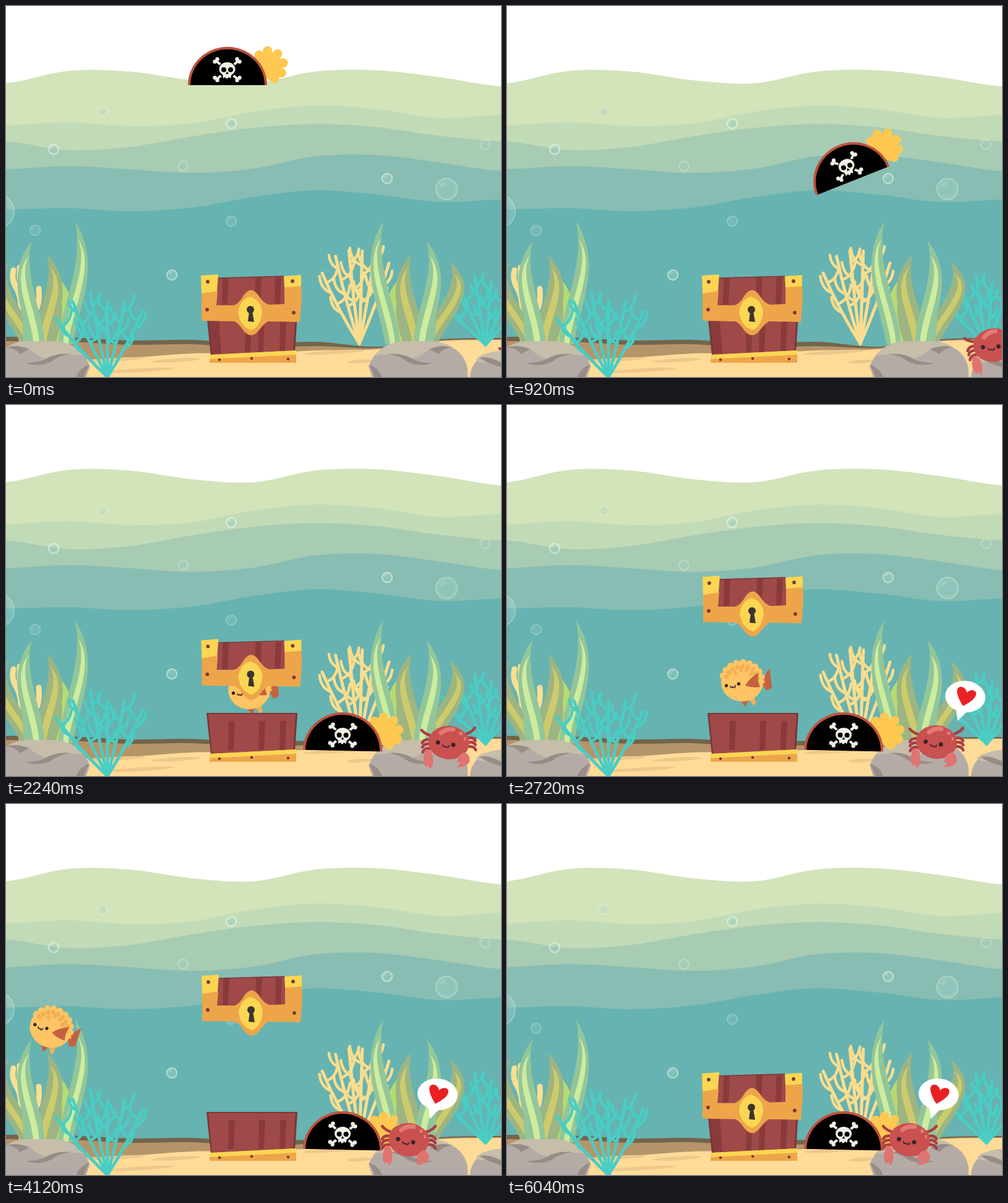
These frames come from a looping animation (800 px wide and 600 px high, 6.08 s). An HTML page with a canvas:

```html
<!DOCTYPE html>
<html lang="en">
<head>
<meta charset="utf-8">
<title>Under the sea</title>
<style>
html, body { margin: 0; width: 100%; height: 100%; overflow: hidden; background: #fff; }
canvas { display: block; width: 800px; height: 600px; }
</style>
</head>
<body>
<canvas id="stage" width="800" height="600"></canvas>
<script>
const LOOP = 6080, STEP = 40;
const stage = document.getElementById('stage').getContext('2d');
let c = stage;

// ---------- drawing helpers ----------
function fill(color, d) {
  c.fillStyle = color;
  c.fill(new Path2D(d));
}
function line(color, width, d) {
  c.strokeStyle = color;
  c.lineWidth = width;
  c.lineCap = c.lineJoin = 'round';
  c.stroke(new Path2D(d));
}
function oval(color, x, y, rx, ry = rx, rot = 0, from = 0, to = 7) {
  c.fillStyle = color;
  c.beginPath();
  c.ellipse(x, y, rx, ry, rot, from, to);
  c.fill();
}
// Draws art made around (ox, oy) at (x, y), turned by deg.
function place([x, y, deg = 0], ox, oy, art) {
  c.save();
  c.translate(x, y);
  c.rotate(deg * Math.PI / 180);
  c.translate(-ox, -oy);
  art();
  c.restore();
}
// Fills everything below a smooth curve with a height every 100 px.
function ground(color, ...h) {
  c.fillStyle = color;
  c.beginPath();
  c.moveTo(0, h[0]);
  const slope = i => ((h[i + 1] ?? h[i]) - (h[i - 1] ?? h[i])) / 6;
  for (let i = 0; i < h.length - 1; i++) {
    const x = i * 100;
    c.bezierCurveTo(x + 33, h[i] + slope(i), x + 67, h[i + 1] - slope(i + 1), x + 100, h[i + 1]);
  }
  c.lineTo(800, 600);
  c.lineTo(0, 600);
  c.fill();
}
function random(seed) {
  return () => (seed = seed * 16807 % 2147483647) / 2147483647;
}

// ---------- motion helpers ----------
const mix = (a, b, u) => a + (b - a) * u;
const smooth = v => (v = Math.max(0, Math.min(1, v)), v * v * (3 - 2 * v));
const ramp = (t, from, to) => smooth((t - from) / (to - from));

// Index of the row that holds time t.
function rowAt(rows, t) {
  let i = 0;
  while (i < rows.length - 2 && t >= rows[i + 1][0]) i++;
  return i;
}
// Rests at every row and eases in between.
function swing(rows, t, sag) {
  const i = rowAt(rows, t), [t0, ...a] = rows[i], [t1, ...b] = rows[i + 1];
  const u = Math.min(1, (t - t0) / (t1 - t0));
  const [x, y, deg] = a.map((v, k) => mix(v, b[k], smooth(u)));
  return [x, y + sag * Math.sin(Math.PI * u), deg];
}
// Passes through every row without stopping.
function glide(rows, t) {
  const i = rowAt(rows, t), a = rows[i], b = rows[i + 1], span = b[0] - a[0];
  const u = (t - a[0]) / span, w = 1 - u;
  const slope = (k, j) => {
    const p = rows[k - 1] || rows[k], q = rows[k + 1] || rows[k];
    return (q[j] - p[j]) / (q[0] - p[0]);
  };
  return [1, 2, 3].map(j => mix(a[j], b[j], smooth(u)) + span * u * w * (slope(i, j) * w - slope(i + 1, j) * u));
}

// ---------- scenery ----------
function water() {
  c.fillStyle = '#fff';
  c.fillRect(0, 0, 800, 600);
  ground('#d3e3ba', 125, 105, 106, 120, 125, 106, 104, 115, 130);
  ground('#c1dbb6', 193, 188, 194, 190, 171, 161, 167, 181, 176);
  ground('#a8cbb3', 219, 233, 228, 211, 197, 191, 196, 210, 219);
  ground('#87bdb3', 264, 259, 264, 270, 263, 243, 241, 253, 267);
  ground('#66b3b1', 329, 327, 332, 326, 309, 298, 305, 317, 313);
}

function bubble(x, y, r, glow) {
  oval(`rgba(225,242,225,${glow / 2})`, x, y, r);
  oval(`rgba(102,179,177,${glow / 2})`, x, y, r * .68);
  oval(`rgba(255,255,255,${glow / 3})`, x - r * .3, y - r * .4, r * .35, r * .2, -.6);
  c.strokeStyle = `rgba(235,248,235,${glow})`;
  c.lineWidth = 1.4;
  c.beginPath();
  c.arc(x, y, r - .7, 0, 7);
  c.stroke();
}
function bubbles() {
  for (const [x, y] of [[364, 190], [77, 232], [616, 279], [268, 435]]) bubble(x, y, 9, .6);
  for (const [x, y] of [[156, 171], [286, 259], [774, 224], [47, 363], [364, 348]]) bubble(x, y, 9, .28);
  bubble(712, 296, 18, .35);
  bubble(-14, 332, 28, .35);
}

function seabed() {
  const ridge = [535, 536, 541, 540, 546, 543, 551, 539, 537];
  ground('#73644c', ...ridge);
  ground('#b6946a', ...ridge.map((y, i) => y + (i < 6 ? 7 : 2)));
  ground('#fedb97', 566, 572, 569, 562, 562, 557, 555, 542, 540);
  for (const [x, y, r] of [[175, 572, 50], [275, 573, 40], [220, 589, 52], [572, 575, 20], [530, 560, 50]]) {
    oval('#edc88b', x, y, r, 3, -.06);
  }
}

// A fan of stems, each with twigs on alternating sides.
function coral(color, x, y, lean, half, height, seed) {
  const rand = random(seed), stems = 6, bend = .5;
  for (let i = 0; i < stems; i++) {
    const f = 2 * i / (stems - 1) - 1, dx = lean + half * f;
    const h = height * (1 - .22 * f * f) * (.85 + .15 * rand());
    const at = u => [x + dx * (1.2 * u * (1 - u) + u * u), y - h * (2 * bend * u * (1 - u) + u * u)];
    const [cx, cy] = [x + dx * .6, y - h * bend];
    line(color, 5, `M${x} ${y}Q${cx} ${cy} ${x + dx} ${y - h}`);
    for (let k = 0; k < 4; k++) {
      const [px, py] = at(.42 + k * .14 + rand() * .05), side = (i + k) % 2 ? 1 : -1;
      const len = height * (.12 + .07 * rand());
      line(color, 4.5, `M${px} ${py}q${side * len * .6} ${-len * .2} ${side * len * .7} ${-len}`);
    }
  }
}

// A leaf from its tip down to the base, bowed sideways, with a paler core.
function blade(color, core, x, y, bow, base, width) {
  const h = 547 - y;
  const leaf = (paint, top, w) => {
    const p = s => `${x + bow + s * w * .6} ${y + h * .35}`;
    const q = s => `${mix(x, base, .6) + s * w * .6} ${y + h * .7}`;
    fill(paint, `M${x + bow * top} ${y + h * top}C${p(-1)} ${q(-1)} ${base - w / 2} 547H${base + w / 2}C${q(1)} ${p(1)} ${x + bow * top} ${y + h * top}Z`);
  };
  leaf(color, 0, width);
  if (core) leaf(core, .14, width * .36);
}

// One tuft of weeds on a rock; the second one is its mirror image.
function tuft() {
  const green = '#92c69a', olive = '#9cb582', pale = '#cdec9d', straw = '#cdcb6c', lime = '#b6db72';
  blade(lime, null, 636, 440, -14, 640, 34);
  blade(olive, lime, 640, 452, 4, 660, 34);
  blade(green, pale, 610, 348, -30, 625, 24);
  blade(olive, straw, 655, 402, -30, 662, 30);
  blade(olive, straw, 717, 413, 38, 682, 30);
  blade(green, null, 692, 465, -12, 678, 24);
  blade(green, pale, 680, 380, 30, 672, 26);
  fill('#b5aba6', 'M586 583Q600 546 642 542H690Q740 550 746 587V600H592Z');
  fill('#c6bdab', 'M597 565Q610 545 642 542H690Q711 544 718 551Q696 550 683 556Q660 576 640 568Q620 562 597 565Z');
  fill('#978c86', 'M615 563Q642 560 659 572Q674 578 691 577Q668 585 648 575Q637 565 615 563ZM684 555Q704 547 720 552Q705 554 699 563Z');
  fill('#978c86', 'M587 580Q602 585 608 600H596Z');
}

function scenery() {
  water();
  bubbles();
  seabed();
  coral('#f9dd8d', 571, 546, -6, 54, 172, 11);
  coral('#49cdc4', 775, 548, -4, 66, 114, 5);
  line('#fadf90', 9, 'M12 427Q8 443 17 457Q28 475 25 540M22 423V463M53 457Q55 481 48 492Q32 506 30 540');
  tuft();
  c.save();
  c.translate(721.5, 0);
  c.scale(-1, 1);
  tuft();
  c.restore();
  oval('#b5aba6', 800, 600, 50, 42);
  oval('#c6bdab', 792, 567, 32, 8, -.15);
  fill('#978c86', 'M765 569Q782 566 800 577V584Q780 579 765 569Z');
  coral('#49cdc4', 164, 600, -14, 70, 143, 23);
}

// ---------- chest ----------
const RED = '#9f4a48', DARK = '#893b3c', EDGE = '#7d3437', ORANGE = '#eea54a', YELLOW = '#fad653';

function rivets(r, ...pts) {
  for (const [x, y] of pts) oval('#7c3a33', x, y, r);
}
function planks(top, bottom, ...xs) {
  for (const x of xs) fill(DARK, `M${x} ${top}h10l-2 ${bottom - top}h-9Z`);
}
function chestBack() {
  fill(EDGE, 'M324 498H471L467 560L331 565Z');
  fill(RED, 'M327 500H468L464 559L333 563Z');
  planks(511, 558, 360, 409, 443);
}
function chestFront() {
  fill(RED, 'M326 505H469L465 559L333 563Z');
  fill(DARK, 'M327 508H344L348 562L333 563Z');
  planks(508, 560, 387, 408, 443);
  line(EDGE, 1.5, 'M327 508L333 563M468 508L465 558');
}
function chestBase() {
  fill(ORANGE, 'M330 564L469 557V577H329Z');
  fill(YELLOW, 'M330 564L469 557V564L330 571Z');
  rivets(2.3, [345, 572], [397, 570], [456, 571]);
}
function lid() {
  fill(RED, 'M341 440L451 437V484H340Z');
  planks(439, 483, 350, 403, 435);
  line(EDGE, 1.3, 'M343 440L449 437');
  fill(ORANGE, 'M316 460L342 461L340 484H368Q377 481 384 468Q396 451 408 468Q417 482 426 483L450 482V453L477 451L478 472L475 511L423 510Q416 515 409 524Q396 541 383 524Q376 513 369 510L316 509Z');
  fill(YELLOW, 'M315 436L343 434L341 461L316 465ZM449 437L477 435V453L450 455Z');
  fill(YELLOW, 'M394 470Q412 475 414 495Q411 520 396 524Q378 518 375 495Q378 475 394 470Z');
  oval('#3b3331', 395, 491, 6);
  fill('#3b3331', 'M393 494H398L401 511L391 510Z');
  rivets(2.9, [326, 446], [463, 445], [325, 491], [465, 496]);
}

// ---------- characters ----------
const INK = '#38242a';

function hat() {
  const bone = '#f2efe4', plume = '#ffc850';
  for (let i = 0; i < 6; i++) {
    const a = -1.9 + i * .52, len = 20 + 14 * Math.sin(Math.PI * (i + .7) / 6);
    line(plume, 15, `M417 103l${len * Math.cos(a)} ${len * Math.sin(a)}`);
  }
  oval('#c0523d', 358, 128, 64, 62, 0, Math.PI, 2 * Math.PI);
  oval('#000', 358, 128, 60, 58, 0, Math.PI, 2 * Math.PI);
  line(bone, 4, 'M341 90L374 118M374 90L341 118');
  for (const sx of [-1, 1]) for (const sy of [-1, 1]) {
    oval(bone, 357.5 + sx * 20, 103 + sy * 13, 3.2);
    oval(bone, 357.5 + sx * 16, 103 + sy * 17, 3.2);
  }
  oval('#000', 357.5, 103, 15, 13);
  oval(bone, 357.5, 102, 13, 11);
  fill(bone, 'M350 109H365L363 117L360 115L357 118L354 115L351 117Z');
  for (const side of [-1, 1]) oval('#000', 357.5 + side * 5.5, 103, 4);
  fill('#000', 'M357.5 106L360 110H355Z');
}

function crab() {
  for (let i = 0; i < 4; i++) {
    const y = 531 + i * 7, drop = 3 - 4 * Math.abs(i - 1.6);
    for (const side of [-1, 1]) {
      line('#a93e43', 4.5, `M${651 + side * 27} ${y}q${side * 12} ${-4} ${side * 16} ${i ? 4 - drop / 3 : -10}`);
    }
  }
  oval('#c95150', 651, 543, 33, 27, .13);
  line('#e27a75', 7, 'M639 527Q648 520 659 522');
  oval('#e27a75', 671, 529, 3);
  oval('#e27a75', 677, 538, 2, 3);
  fill('#df7471', 'M613 553Q621 550 624 562Q626 579 619 585L616 578L613 582Q605 573 613 553Z');
  fill('#df7471', 'M675 560Q685 563 683 575Q678 585 662 583L669 576L663 576Q665 562 675 560Z');
  oval(INK, 633.5, 542, 3.4);
  oval(INK, 658, 547, 3.4);
  line(INK, 1.8, 'M641 546Q642 551 646 549Q649 553 651 548');
}

function love() {
  oval('#fff', 697.5, 469.5, 32.5, 25.5, .1);
  fill('#fff', 'M682 485L685 509L704 490Z');
  fill('#ea2024', 'M694 485C688 476 682 463 685 457C689 450 699 455 700 463C705 457 716 458 715 466C713 475 702 480 694 485Z');
}

function fish() {
  const skin = '#ffc463', scale = '#f2af55', fin = '#c36141';
  fill(fin, 'M358 437L367 431Q370 419 376 415L379 446L370 450L365 441ZM326 463L336 476L341 464Z');
  fill(scale, 'M336 457L349 474L353 470L350 459L342 454ZM358 425L369 436L358 444Z');
  oval(skin, 331, 436, 34, 31);
  for (let i = 0; i < 9; i++) {
    const a = 3.45 + i * .33, cos = Math.cos(a), sin = Math.sin(a);
    oval(skin, 331 + 32 * cos, 434 + 30 * sin, 5.5);
    oval(scale, 331 + 26 * cos, 434 + 24 * sin, 4, 3.4, a);
    if (i % 2) oval(scale, 333 + 15 * cos, 430 + 15 * sin, 4, 3, a);
  }
  fill(fin, 'M336 441Q344 428 358 421Q355 433 360 444Q346 446 336 441Z');
  oval(INK, 305.5, 441, 2.7);
  oval(INK, 325.5, 438.5, 2.7);
  line(INK, 1.7, 'M312 442Q313 446 316 443Q319 447 320 441');
}

// ---------- timeline: [time, x, y, angle] ----------
const OPEN = 1940, SHUT = 4760;
const hatFall = [[0, 358, 128, 0], [300, 252, 170, 14], [960, 562, 280, -22], [1560, 390, 492, 14], [2040, 544, 559, 1.3]];
const fishSwim = [[OPEN, 396, 490, 0], [2240, 393, 461, 0], [3200, 349, 438, 0], [3840, 214, 409, 12], [4120, 72, 363, 25], [4640, -62, 284, 28]];

function lidRise(t) {
  if (t < OPEN) return 0;
  if (t < SHUT) return 158 * (ramp(t, OPEN, 2690) - ramp(t, 4440, SHUT));
  const hop = t < SHUT + 680 ? 8 : 2;
  return hop * Math.sin(Math.PI * (t - SHUT) / 680) ** 2;
}
// Scuttles in from the right and slows down.
function crabWalk(t) {
  const u = Math.max(0, 1 - t / 3900);
  return [651 + 120 * u + 75 * u * u, 543 + 7 * u, -32 * u ** 3];
}

function draw(t) {
  c.drawImage(backdrop, 0, 0);
  if (t > OPEN && t < 4640) place(glide(fishSwim, t), 331, 436, fish);
  chestBack();
  const rise = lidRise(t), closed = t <= OPEN || t >= SHUT;
  if (closed) place([0, -rise], 0, 0, chestFront);
  chestBase();
  place([rise / 158, -rise], 0, 0, lid);
  place(swing(hatFall, t, 20 * (1 - ramp(t, 1400, 1600))), 358, 128, hat);
  const spot = crabWalk(t);
  place(spot, 651, 543, crab);
  if (t >= 2600) place(spot.slice(0, 2), 651, 543, love);
}

const backdrop = document.createElement('canvas');
backdrop.width = 800;
backdrop.height = 600;
c = backdrop.getContext('2d');
scenery();
c = stage;

const start = performance.now();
function tick() {
  const t = (performance.now() - start) % LOOP;
  draw(Math.floor(t / STEP) * STEP);
  requestAnimationFrame(tick);
}
tick();
</script>
</body>
</html>
```
